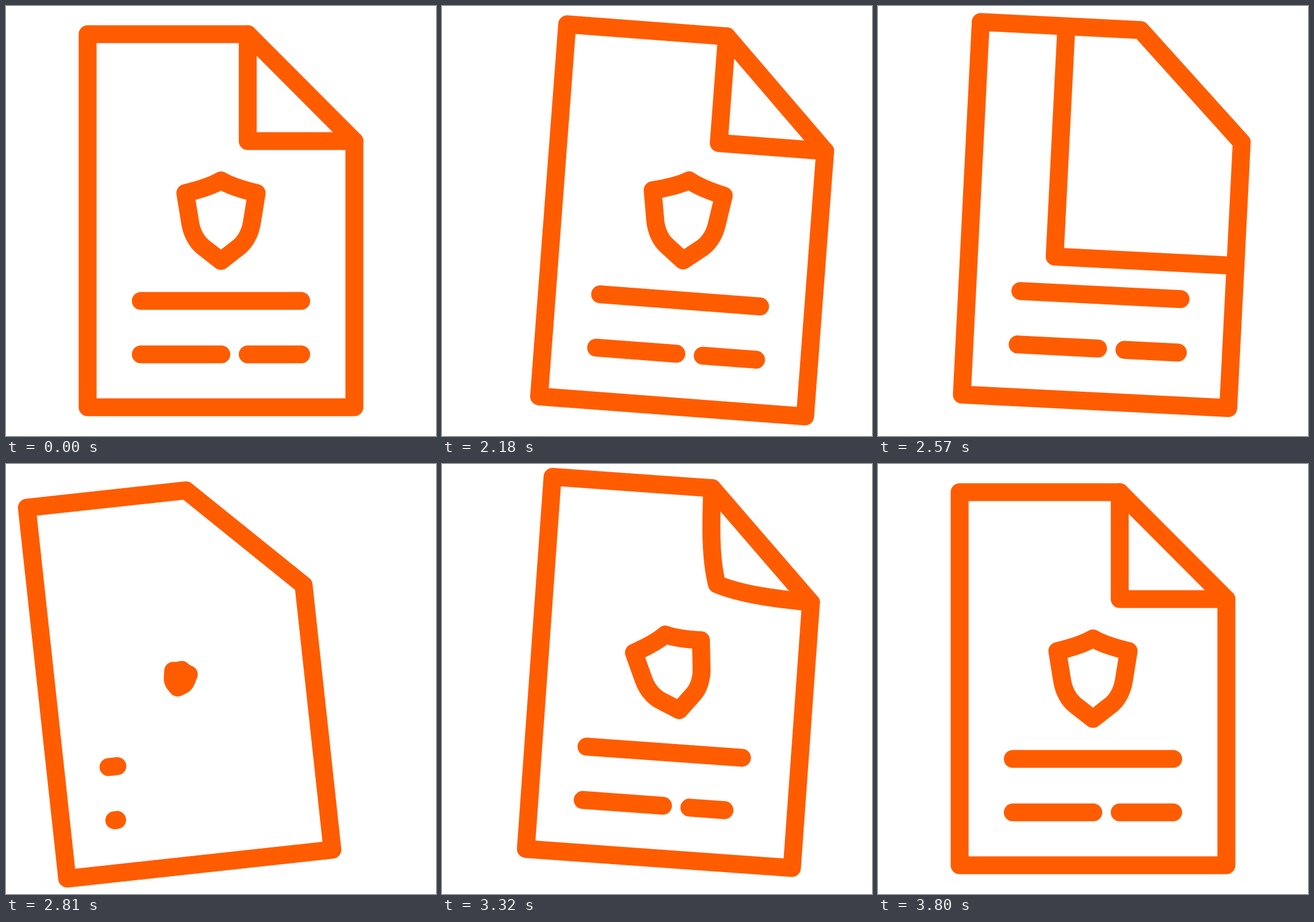
Recreate the animation shown at these times as an HTML page with a canvas. Size 748 by 748 pixels, loop 3830 ms.

```html
<!DOCTYPE html>
<html lang="en">
<head>
<meta charset="utf-8">
<title>Document with shield</title>
<style>
  html, body { margin: 0; width: 100%; height: 100%; overflow: hidden; background: #fff; }
  canvas { display: block; width: 748px; height: 748px; }
</style>
</head>
<body>
<canvas id="stage" width="748" height="748"></canvas>
<script>
const ctx = document.getElementById('stage').getContext('2d');
const LOOP = 3830, START = 2030, STEP = 30;
const ORANGE = '#ff5c00', STROKE = 31.2;
const CX = 374, CY = 373.5;
const L = 142, R = 606, T = 49, B = 698;
const FOLD_X = 420.5, FOLD_Y = 235;
const PEEL = [2368, 2792], REDRAW = 2695, REFOLD = [3110, 3410];

// Rocking of the whole page: [ms, value]
const swayX = [[2000, 0], [2365, 103.5], [2540, 43], [2570, 20], [2805, -72],
  [3080, -36], [3320, 26.5], [3365, 29.5], [3620, 9.5], [3800, 0]];
const swayY = [[2000, 0], [2365, -2], [2540, -10.4], [2600, -9], [2810, 0],
  [2960, 8], [3080, 4.5], [3320, -11], [3400, -14], [3620, -5.2], [3800, 0]];
const tilt = [[2000, 0], [2370, 9], [2540, 4.4], [2570, 2.9], [2810, -6.2],
  [2870, -6.9], [3080, -4.6], [3320, 4.1], [3390, 4.9], [3620, 2.1], [3800, 0]];
const shieldTilt = [[2695, 22], [2810, 19], [3310, -14.6], [3600, 0]];

const clamp = v => Math.max(0, Math.min(1, v));
const mix = (a, b, u) => a + (b - a) * u;
const rad = deg => deg * Math.PI / 180;
const ramp = (t, from, to) => clamp((t - from) / (to - from));
const smooth = (t, from, to) => {
  const u = ramp(t, from, to);
  return u * u * (3 - 2 * u);
};

// Monotone cubic through the keys: flat at every turning point
function track(keys, t) {
  const n = keys.length - 1;
  if (t <= keys[0][0]) return keys[0][1];
  if (t >= keys[n][0]) return keys[n][1];
  const slope = i => (keys[i + 1][1] - keys[i][1]) / (keys[i + 1][0] - keys[i][0]);
  const tangent = i => {
    if (i === 0 || i === n) return 0;
    const a = slope(i - 1), b = slope(i);
    return a * b <= 0 ? 0 : 2 * a * b / (a + b);
  };
  let i = 0;
  while (t > keys[i + 1][0]) i++;
  const [t0, v0] = keys[i], [t1, v1] = keys[i + 1];
  const h = t1 - t0, u = (t - t0) / h, w = 1 - u;
  return v0 * w * w * (1 + 2 * u) + v1 * u * u * (3 - 2 * u)
    + h * u * w * (tangent(i) * w - tangent(i + 1) * u);
}

const page = new Path2D(`M${L} ${T}H${FOLD_X}L${R} ${FOLD_Y}V${B}H${L}Z`);
const shield = new Path2D(
  'M0 -70C-16 -60.5 -39 -53.5 -62 -48L-53.5 4.5C-50 24.5 -40 38.5 -32 45L0 70' +
  'L32 45C40 38.5 50 24.5 53.5 4.5L62 -48C39 -53.5 16 -60.5 0 -70Z');

function drawShield(scale, angle) {
  const placed = new Path2D();
  placed.addPath(shield, new DOMMatrix().translate(CX, CY).rotate(angle).scale(scale));
  ctx.stroke(placed);
}

function drawLine(x, y, length) {
  if (length <= 0) return;
  ctx.beginPath();
  ctx.moveTo(x, y);
  ctx.lineTo(x + length, y);
  ctx.stroke();
}

function drawContent(t) {
  if (t < REDRAW) {
    drawShield(1, 0);
    drawLine(234.5, 513, 279);
    drawLine(234.5, 606, 140);
    drawLine(420.5, 606, 93);
    return;
  }
  const scale = 1 - Math.pow(1 - ramp(t, 2690, 3390), 1.35);
  drawShield(Math.max(scale, 0.01), track(shieldTilt, t));
  if (t > 2714) drawLine(234.5, 513, 279 * smooth(t, 2714, 3388));
  const run = 233 * smooth(t, 2746, 3493);
  drawLine(234.5, 606, Math.min(run, 140));
  drawLine(420.5, 606, run - 140);
}

function paintFold(line) {
  const area = new Path2D(line);
  area.lineTo(R, FOLD_Y);
  area.lineTo(FOLD_X, T);
  area.closePath();
  ctx.fill(area);
  ctx.stroke(line);
}

// The fold sweeps across the sheet to the lower left corner
function drawPeel(t) {
  const u = smooth(t, ...PEEL);
  const x = mix(FOLD_X, L, u), y = mix(FOLD_Y, B, u);
  paintFold(new Path2D(`M${x} ${T}V${y}H${R}`));
}

// A new fold bends in from the cut corner
function drawRefold(t) {
  const k = smooth(t, ...REFOLD), j = 1 - k;
  const x = mix((FOLD_X + R) / 2, FOLD_X, k), y = mix((T + FOLD_Y) / 2, FOLD_Y, k);
  const lean = Math.min(46, 70 * j), near = 46 * j * j, far = 46 + 20 * k;
  const line = new Path2D();
  line.moveTo(FOLD_X, T);
  line.bezierCurveTo(FOLD_X + near, T + far, x - lean, y - 46, x, y);
  line.bezierCurveTo(x + 46, y + lean, R - far, FOLD_Y - near, R, FOLD_Y);
  paintFold(line);
}

function draw(t) {
  ctx.setTransform(1, 0, 0, 1, 0, 0);
  ctx.fillStyle = '#fff';
  ctx.fillRect(0, 0, 748, 748);
  ctx.strokeStyle = ORANGE;
  ctx.lineWidth = STROKE;
  ctx.lineCap = ctx.lineJoin = 'round';

  ctx.translate(CX + track(swayX, t), CY + track(swayY, t));
  ctx.rotate(rad(track(tilt, t)));
  ctx.translate(-CX, -CY);

  if (t < REDRAW) drawContent(t);
  if (t < PEEL[1]) drawPeel(t);
  if (t > REFOLD[0]) drawRefold(t);
  ctx.stroke(page);
  if (t >= REDRAW) drawContent(t);
}

const origin = performance.now();
function tick() {
  const t = (performance.now() - origin) % LOOP;
  draw(t < START ? 0 : START + Math.floor((t - START) / STEP) * STEP);
  requestAnimationFrame(tick);
}
tick();
</script>
</body>
</html>
```
